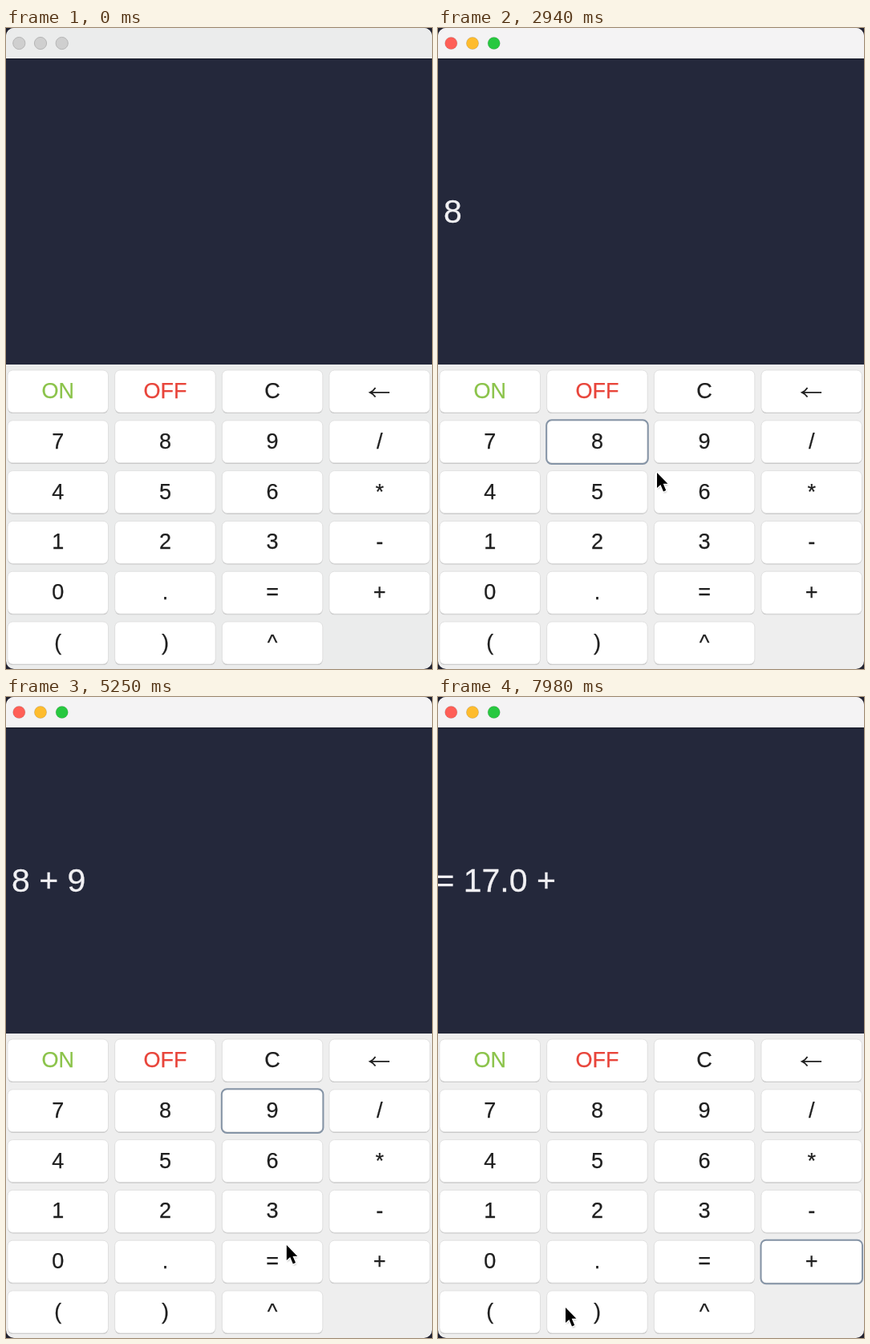
Animation of 531 by 800 pixels, one loop 8000 ms. Source, as an HTML page:

```html
<!DOCTYPE html>
<html lang="en">
<head>
<meta charset="utf-8">
<title>Calculator</title>
<style>
  html, body { margin: 0; width: 100%; height: 100%; overflow: hidden; background: #24283b; }
  svg { display: block; width: 100%; height: 100%; }
  text { font-family: "Liberation Sans", Arial, sans-serif; white-space: pre; }
  .key { font-size: 27px; text-anchor: middle; stroke-width: .25px; }
  #readout { font-size: 41px; fill: #f1f0f3; stroke: #f1f0f3; stroke-width: .3px; }
</style>
</head>
<body>
<svg viewBox="0 0 531 800" id="stage">
  <defs>
    <clipPath id="window"><rect width="531" height="800" rx="10"/></clipPath>
    <filter id="soft" x="-60%" y="-60%" width="220%" height="220%"><feGaussianBlur stdDeviation="1.3"/></filter>
  </defs>
  <rect width="531" height="800" fill="#20212f"/>
  <g clip-path="url(#window)">
    <rect id="panel" width="531" height="800"/>
    <rect id="bar" width="531" height="38"/>
    <rect y="38" width="531" height="382" fill="#24283b"/>
    <rect y="38" width="531" height="1.2" fill="#171a28"/>
    <g id="lights"></g>
    <text id="readout" y="243"></text>
    <g id="keys"></g>
    <rect id="ring" width="126.6" height="54.6" rx="6.5" fill="none" stroke="#8594a6" stroke-width="2"/>
  </g>
  <g id="cursor">
    <path d="M0 0V19L4.4 15L8 23.4L11.2 22L7.7 13.8H13.4Z" transform="translate(.8 1.8)" fill="#000" opacity=".35" filter="url(#soft)"/>
    <path d="M0 0V19L4.4 15L8 23.4L11.2 22L7.7 13.8H13.4Z" fill="#000" stroke="#fff" stroke-width="2.6" stroke-linejoin="round" paint-order="stroke"/>
  </g>
</svg>
<script>
const LOOP = 8000, STEP = 70;
const $ = id => document.getElementById(id);

function add(parent, tag, attrs, text) {
  const el = document.createElementNS('http://www.w3.org/2000/svg', tag);
  for (const k in attrs) el.setAttribute(k, attrs[k]);
  if (text) el.textContent = text;
  return parent.appendChild(el);
}
const set = (el, attrs) => { for (const k in attrs) el.setAttribute(k, attrs[k]); };

// Keypad
const rows = ['ON OFF C ←', '7 8 9 /', '4 5 6 *', '1 2 3 -', '0 . = +', '( ) ^'];
const inks = { ON: '#8bc34a', OFF: '#e8443a' };
const corner = {};
rows.forEach((row, r) => row.split(' ').forEach((label, c) => {
  const x = 2 + c * 133.65, y = 427 + r * 62.8, g = $('keys');
  const box = { x, width: 125.5, height: 53, rx: 6.5 };
  const ink = inks[label] || '#1f1f1f';
  corner[label] = [x, y];
  add(g, 'rect', { ...box, y: y + 1.1, fill: '#c4c4c4' });
  add(g, 'rect', { ...box, y, fill: '#fff', stroke: '#dcdcdc', 'stroke-width': .8 });
  if (label === '←') {
    add(g, 'path', { d: 'M478 454.8H454M460.5 449Q458 453 453.8 454.8Q458 456.6 460.5 460.6',
      fill: 'none', stroke: ink, 'stroke-width': 1.8 });
  } else {
    add(g, 'text', { class: 'key', x: x + 62.75, y: y + 35, fill: ink, stroke: ink }, label);
  }
}));

const lights = ['#ff5f57', '#febc2e', '#28c840'].map((color, i) => ({
  color, el: add($('lights'), 'circle', { cx: 16.3 + i * 26.7, cy: 19, r: 7.6 })
}));

// Each press: focus time, label, time of the new readout, its text and x
const ACTIVE = 2660;
const presses = [
  [2660, '8', 2730, '8', 7],
  [3920, '+', 3990, '8 +', 7],
  [4690, '9', 4760, '8 + 9', 7],
  [5530, '=', 5600, '= 17.0', -3.6],
  [7070, '+', 7210, '= 17.0 +', -3.6]
];

// Pointer stops: time, x, y
const path = [
  [1890, 453, 353], [2170, 315, 435], [2520, 213, 512], [2800, 213, 512],
  [2940, 273, 555], [3430, 338, 524], [3710, 450, 693], [3990, 450, 693],
  [4550, 354.5, 532], [4690, 347, 523], [4900, 347, 523], [5320, 350, 697],
  [6090, 350, 697], [6860, 450, 697], [7210, 450, 697], [7350, 424, 609],
  [7980, 159, 762]
];

function slope(i, axis) {
  const a = path[i - 1], b = path[i], c = path[i + 1];
  if (!a || !c) return 0;
  const before = (b[axis] - a[axis]) / (b[0] - a[0]);
  const after = (c[axis] - b[axis]) / (c[0] - b[0]);
  return before * after <= 0 ? 0 : 2 * before * after / (before + after);
}

function pointer(t, axis) {
  let i = 0;
  while (i < path.length - 2 && t >= path[i + 1][0]) i++;
  const p = path[i], q = path[i + 1], d = q[0] - p[0];
  const u = Math.min(1, (t - p[0]) / d), v = 1 - u;
  return p[axis] * v * v * (1 + 2 * u) + q[axis] * u * u * (3 - 2 * u)
    + d * u * v * (v * slope(i, axis) - u * slope(i + 1, axis));
}

function draw(time) {
  const t = Math.floor((time % LOOP) / STEP) * STEP;
  const active = t >= ACTIVE;
  set($('panel'), { fill: active ? '#eeeeee' : '#ebecec' });
  set($('bar'), { fill: active ? '#f4f3f4' : '#ebecec' });
  lights.forEach(({ el, color }) => set(el, {
    fill: active ? color : '#cfcfcf',
    stroke: active ? 'rgba(0,0,0,.12)' : '#b6b6b6', 'stroke-width': 1
  }));

  const focus = presses.filter(p => t >= p[0]).pop();
  const shown = presses.filter(p => t >= p[2]).pop();
  $('ring').style.display = focus ? '' : 'none';
  if (focus) {
    const [x, y] = corner[focus[1]];
    set($('ring'), { x: x - .5, y: y - .5 });
  }
  $('readout').textContent = shown ? shown[3] : '';
  if (shown) set($('readout'), { x: shown[4] });

  const visible = t >= path[0][0];
  $('cursor').style.display = visible ? '' : 'none';
  if (visible) set($('cursor'), { transform: `translate(${pointer(t, 1)} ${pointer(t, 2)})` });
}

const start = performance.now();
function tick() {
  draw(performance.now() - start);
  requestAnimationFrame(tick);
}
tick();
</script>
</body>
</html>
```
